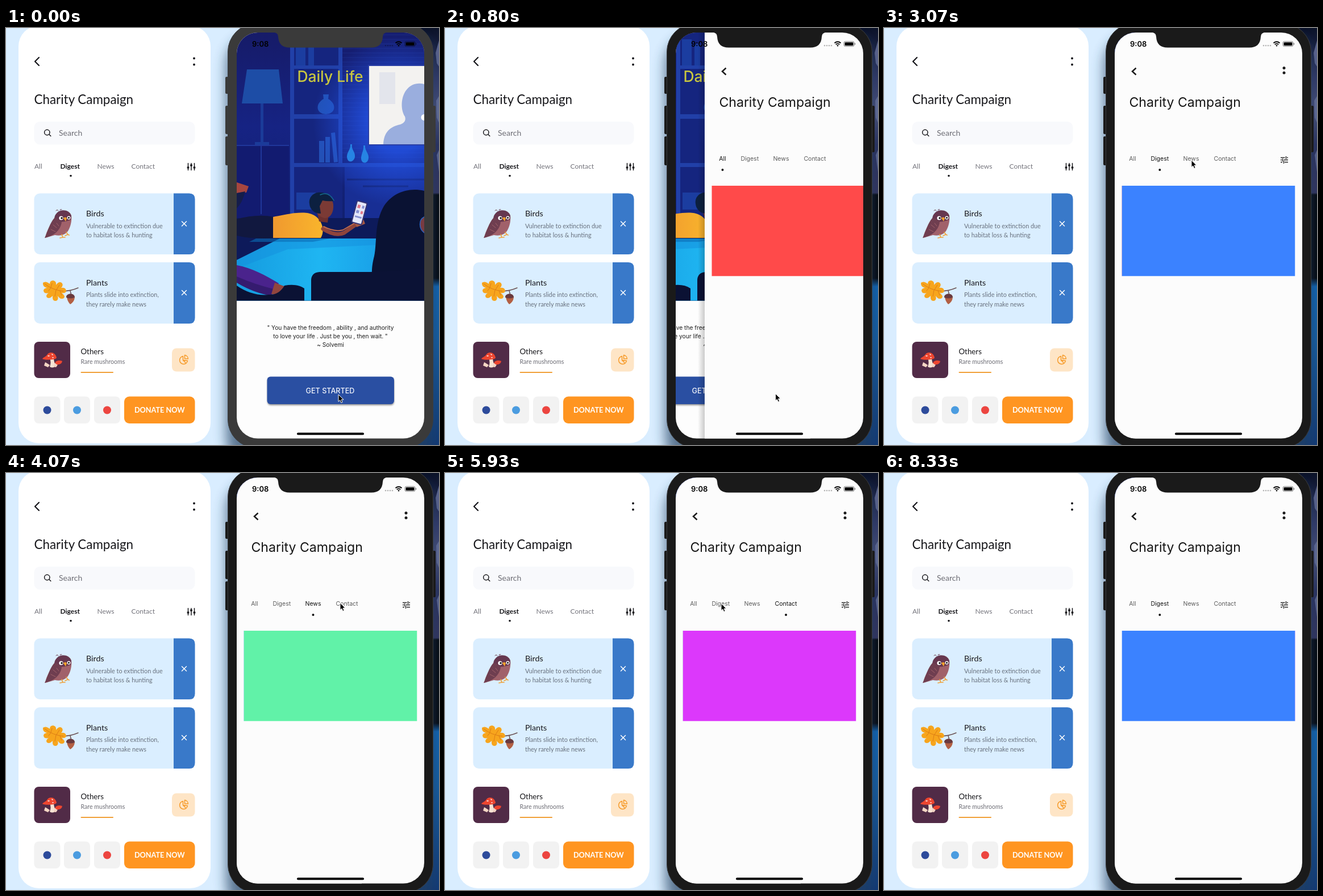
An HTML page for the animation above (8.39 s loop, 762 by 735 pixels).

```html
<!DOCTYPE html>
<html lang="en">
<head>
<meta charset="utf-8">
<title>Charity Campaign</title>
<style>
  html, body { margin: 0; width: 100%; height: 100%; overflow: hidden; background: #d9edff; }
  svg { display: block; width: 762px; height: 735px; }
  .card { font-family: Lato, sans-serif; }
  .phone { font-family: Inter, sans-serif; }
  .mid { text-anchor: middle; }
  .line { fill: none; stroke-linecap: round; stroke-linejoin: round; }
</style>
</head>
<body>
<svg viewBox="0 0 762 735" xmlns="http://www.w3.org/2000/svg">
  <defs>
    <clipPath id="screen"><rect x="406" y="8" width="330" height="715.5" rx="37"/></clipPath>
    <clipPath id="tabView"><rect x="418.5" y="278" width="305" height="159.5"/></clipPath>
    <clipPath id="art"><rect x="406" y="8" width="330" height="472.5"/></clipPath>
    <filter id="blur" x="-20%" y="-20%" width="140%" height="140%"><feGaussianBlur stdDeviation="11"/></filter>
    <filter id="soft" x="-20%" y="-40%" width="140%" height="180%"><feGaussianBlur stdDeviation="1.6"/></filter>
    <linearGradient id="wall" x1="0" y1="0" x2="0" y2="1">
      <stop offset="0" stop-color="#161b68"/><stop offset=".35" stop-color="#162383"/>
      <stop offset=".7" stop-color="#11206f"/><stop offset="1" stop-color="#0b1750"/>
    </linearGradient>
    <radialGradient id="glow" gradientUnits="userSpaceOnUse" cx="690" cy="165" r="150">
      <stop offset=".35" stop-color="#2459f5" stop-opacity=".75"/><stop offset="1" stop-color="#2459f5" stop-opacity="0"/>
    </radialGradient>
    <linearGradient id="rug" x1="0" y1="0" x2="1" y2="0">
      <stop offset="0" stop-color="#159bdf"/><stop offset=".45" stop-color="#1fb6f2"/><stop offset="1" stop-color="#1590e0"/>
    </linearGradient>
    <linearGradient id="edge"><stop offset="0" stop-opacity="0"/><stop offset="1" stop-opacity=".2"/></linearGradient>
    <linearGradient id="desk" x1="0" y1="0" x2="0" y2="1">
      <stop offset="0" stop-color="#0a1228"/><stop offset=".12" stop-color="#34386a"/><stop offset=".2" stop-color="#50547f"/>
      <stop offset=".28" stop-color="#2c3060"/><stop offset=".395" stop-color="#35325f"/><stop offset=".4" stop-color="#020308"/>
      <stop offset=".6" stop-color="#020308"/><stop offset=".62" stop-color="#0f69bd"/><stop offset=".75" stop-color="#1460a8"/>
      <stop offset="1" stop-color="#0f3878"/>
    </linearGradient>
    <linearGradient id="shirt"><stop offset="0" stop-color="#f0992f"/><stop offset="1" stop-color="#f9b52c"/></linearGradient>
  </defs>

  <rect width="762" height="735" fill="#d9edff"/>
  <rect x="700" width="62" height="735" fill="url(#desk)"/>
  <path d="M762 22l-6 22 2 18 4 6zM762 120l-5 8 1 30 4 9zM762 215l-4 9 4 30z" fill="#7a81ae" opacity=".7"/>
  <rect x="388" y="14" width="366" height="760" rx="50" fill="#223f60" opacity=".7" filter="url(#blur)"/>

  <!-- design card -->
  <g class="card" fill="#17171b">
    <rect x="22" y="-4" width="338" height="736" rx="36" fill="#fff"/>
    <path class="line" d="M58 52l-7 7 7 7" stroke="#17171b" stroke-width="2.2"/>
    <circle cx="331" cy="53.5" r="1.9"/><circle cx="331" cy="64.5" r="1.9"/>
    <text x="49.5" y="133.5" font-size="22.4">Charity Campaign</text>
    <rect x="49.5" y="165" width="283" height="40.5" rx="10" fill="#f8f9fc"/>
    <g class="line" stroke="#17171b" stroke-width="1.5"><circle cx="72.3" cy="184" r="4.7"/><path d="M75.8 187.5l3 3"/></g>
    <text x="93" y="190" font-size="14" fill="#6c6c74">Search</text>
    <g font-size="12" fill="#74747c">
      <text x="50" y="248">All</text>
      <text x="95.5" y="248" font-weight="700" fill="#17171b">Digest</text>
      <text x="160.5" y="248">News</text>
      <text x="220.5" y="248">Contact</text>
    </g>
    <circle cx="114" cy="260.5" r="1.8"/>
    <path class="line" d="M320.5 238.5v12M326 238.5v12M331.5 238.5v12" stroke="#17171b" stroke-width="1.5"/>
    <circle cx="320.5" cy="246" r="2"/><circle cx="326" cy="242" r="2"/><circle cx="331.5" cy="246" r="2"/>

    <g id="cards"></g>

    <!-- bird -->
    <path d="M92 322q-2-3-4 0M95 321q0-2 3-1" class="line" stroke="#68384b"/>
    <path d="M88 331c4-12 24-12 27 0 1 8-1 19-6 27-5 7-14 9-23 7l-17 5c2-13 10-24 19-39z" fill="#a1616a"/>
    <path d="M85 337c0-17 24-22 30-6l-1 7-9 3-10 1z" fill="#66374f"/>
    <path d="M85 335c-8 9-11 22-17 35 16-4 27-12 30-27-2-5-8-8-13-8z" fill="#6f3e50"/>
    <path d="M83 347l6 5M79 355l8 4M89 344l4 5" class="line" stroke="#a1636a"/>
    <circle cx="97" cy="335" r="3.6" fill="#fff"/><circle cx="110.500" cy="334.500" r="3" fill="#fff"/>
    <circle cx="98" cy="335" r="1.8"/><circle cx="110.500" cy="334.500" r="1.600"/>
    <path d="M101 335q3-3 6 0l-2 6z" fill="#f5a32c"/>
    <path class="line" d="M98 364l2 5-5 1M100 369l4 0M106 360l3 4-5 2M109 364l2 1" stroke="#f0a13a" stroke-width="1.700"/>

    <!-- oak leaf and acorn -->
    <path class="line" d="M84 462q22 5 43-4M113 463l2 8" stroke="#6c5354" stroke-width="1.500"/>
    <path d="M65 449q5-4 12 2 0-6 6-6 6 1 5 8 5-7 10-4 4 4-1 9 8-1 9 5 0 5-8 4 7 5 4 9-6 4-11-4 2 8-3 9-7 1-6-9-5 6-10 3-3-4 3-8-8 2-9-4 0-4 6-5-8-2-7-9z" fill="#f7a51d"/>
    <path class="line" d="M68 451q14 11 33 13M79 457l2-7M89 461l5-8M79 458l-4 5M88 462l-2 11M95 463l3 8" stroke="#dd7d15"/>
    <path d="M107 474q7 3 14 1-1 8-8 12-5-5-6-13z" fill="#b35f43"/>
    <path d="M106 475c-1-8 15-9 15 0q-8 3-15 0z" fill="#693a3e"/>

    <!-- mushrooms -->
    <rect x="49.5" y="553" width="63.5" height="64" rx="8" fill="#512b47"/>
    <path d="M77 581h7q0 8 4 14-5 6-11 2 3-7 0-16z" fill="#f7e4d4"/>
    <path d="M64 583c2-3 7-4 9-8 4-5 14-4 16 6 1 4-22 5-25 2z" fill="#ed4630"/>
    <path d="M85 591l6 0q0 4-3 7l-4-1z" fill="#f3d4c4"/><path d="M86 590q4-6 13-3-1 7-10 6z" fill="#ed4630"/>
    <path d="M69 589l8 5-3 4-7-3z" fill="#f4d6c4"/>
    <path d="M74 578h2M81 575l1 1M82 581h1" class="line" stroke="#fff" stroke-width="1.500"/>

    <text x="131.5" y="574.5" font-size="13.3">Others</text>
    <text x="131.5" y="592" font-size="10.6" fill="#6c6c74">Rare mushrooms</text>
    <rect x="131.5" y="606" width="57.5" height="2" rx="1" fill="#f0a038"/>
    <rect x="292" y="564.5" width="40.5" height="41" rx="8" fill="#fee5c6"/>
    <path class="line" d="M311.500 578.500a7 7 0 1 0 8 8l-8-1zM314.500 576.500a7 7 0 0 1 6 6.500h-6zM311.500 585.500l5 5" stroke="#f69c2c" stroke-width="1.500"/>

    <g fill="#f2f2f2">
      <rect x="49.5" y="649.5" width="46" height="47.5" rx="8"/>
      <rect x="102" y="649.5" width="46" height="47.5" rx="8"/>
      <rect x="155" y="649.5" width="46" height="47.5" rx="8"/>
    </g>
    <circle cx="72.5" cy="673.5" r="7" fill="#2d4b9b"/>
    <circle cx="125" cy="673.5" r="7" fill="#4b9ce0"/>
    <circle cx="178" cy="673.5" r="7" fill="#ec4540"/>
    <rect x="208" y="649.5" width="124.5" height="47.5" rx="9" fill="#ff9521"/>
    <text class="mid" x="270.3" y="677.5" font-size="12.7" font-weight="700" fill="#fff">DONATE NOW</text>
  </g>

  <!-- phone -->
  <g class="phone">
    <g id="bezel" fill="#1a1a1a">
      <path d="M386 88q0-2 2-2h4v30h-4q-2 0-2-2zM386 139q0-2 2-2h4v50h-4q-2 0-2-2zM386 193q0-2 2-2h4v51h-4q-2 0-2-2zM750 137h4q2 0 2 2v78q0 2-2 2h-4z"/>
      <rect x="390.5" y="-8" width="361" height="748" rx="50" stroke="#3b3c3e"/>
    </g>
    <g clip-path="url(#screen)">
      <g id="landing">
        <rect x="406" y="8" width="330" height="716" fill="#fdfdfd"/>
        <g clip-path="url(#art)">
          <rect x="406" y="8" width="330" height="473" fill="url(#wall)"/>
          <rect x="592" y="8" width="144" height="232" fill="#151d70"/>
          <path id="blinds" stroke="#243492" opacity=".6"/>
          <rect x="500" y="8" width="92" height="330" fill="#15257f"/>
          <path d="M500 8h7v325h-7zM585 8h7v230h-7zM500 66h92v6h-92zM500 152h92v8h-92zM500 238h236v7h-236z" fill="#2140a8"/>
          <path d="M510 20h17v46h-17zM532 28h10v38h-10zM511 290h34v30h-34z" fill="#1b3da0"/>
          <path d="M424 73h56l7 60h-72z" fill="#1d4da6"/><path d="M448 133h5v68h-5zM438 201h25v5h-25z" fill="#1b3b99"/>
          <path d="M406 206h92v130h-92z" fill="#121b70"/><path d="M406 207h92M449 208v120" stroke="#20379a" stroke-width="2"/>
          <path d="M558 117h10l-1 8c15 8 14 26-4 27-18-1-19-19-4-27z" fill="#2152b6"/>
          <path d="M551 199h9v38h-9zM562 192h8v45h-8zM572 185l7-1 5 52-7 1z" fill="#2350b5"/>
          <rect x="596" y="245" width="140" height="95" fill="#182e94"/>
          <path d="M600 267h136M628 279h80" stroke="#12206f" stroke-width="3"/>
          <rect x="500" y="8" width="236" height="330" fill="url(#glow)"/>
          <rect x="638" y="66" width="106" height="140" fill="#f3f2f0" stroke="#2a3fa6" stroke-width="2"/>
          <rect x="657" y="78" width="28" height="56" fill="#e3e5ec"/>
          <path d="M664 205c1-22 12-31 30-35 8-3 10-8 8-14-8-12-7-34 2-46 9-12 21-14 32-11v106z" fill="#9aaede"/>
          <circle cx="736" cy="157.5" r="5.5" fill="#fff"/>
          <path d="M606 205h3c-2 9 6 13 5 22-1 9-13 13-14 0 0-9 7-13 6-22zM629 207h3c-1 9 7 14 6 22-1 12-14 11-13-1 1-8 5-13 4-21z" fill="#2684e4"/>
          <path d="M406 335h330v146h-330z" fill="#0d1a5a"/>
          <path d="M406 409l76-38h254v110h-330z" fill="url(#rug)"/>
          <path d="M406 424l90-34 164-8v-11h-178l-76 38z" fill="#1590dd" opacity=".5"/>
          <path d="M440 371h130l-30 6h-112z" fill="#0b6fb8" opacity=".6"/>
          <!-- reader -->
          <path d="M406 272l21 7-4 11-17 1z" fill="#a6463f"/>
          <path d="M406 337q35-10 66-4v37q-36 3-66-4z" fill="#11183f"/>
          <path d="M406 291l15-3q-5 20-15 30z" fill="#151d4a"/>
          <path d="M470 333c23-4 56-13 72-3 14 8 20 26 12 40h-84z" fill="url(#shirt)"/>
          <path d="M548 327h20l-2 16-15-2z" fill="#6c302f"/>
          <path d="M539 302c12-12 36-6 37 9 1 13-4 23-14 24-12-1-22-14-23-33z" fill="#7b3a35"/>
          <path d="M534 310c-3-21 24-27 37-12l6 7q-12 1-20-1l-5 10 2 13c-8 1-19-5-20-17z" fill="#0c2040"/>
          <path d="M553 294q15-7 24 10" class="line" stroke="#146d8e" stroke-width="1.5"/>
          <path class="line" d="M558 354q22 14 37 7l24-17" stroke="#8f443b" stroke-width="7"/>
          <path class="line" d="M559 350q19 10 34 6l22-13" stroke="#c06b4b" stroke-width="2"/>
          <path d="M612 339l17-2 3 8-15 6z" fill="#a65843"/>
          <g transform="rotate(15 622 325)">
            <rect x="613" y="306" width="18" height="39" rx="2" fill="#e4e7fa" stroke="#353474" stroke-width="2"/>
            <path d="M616 312h5v6h-5zM624 322h4v5h-4z" fill="#e2788a"/><path d="M624 312h4v5h-4zM616 322h5v5h-5zM616 332h12v3h-12z" fill="#8791d2"/>
          </g>
          <!-- foreground figures -->
          <path d="M655 480c-15-38-12-58-7-78 5-25 0-59 17-88 14-22 41-34 71-27v194z" fill="#0a1233"/>
          <path d="M736 333c-10 5-10 20 0 28z" fill="#783b42"/>
          <path class="line" d="M736 333c-10 5-10 20 0 28" stroke="#2c63bd" stroke-width="1.5"/>
          <path d="M537 481v-36q0-14 15-15h80q28 0 104-6v57z" fill="#0b1235"/>
          <path d="M406 418c28 5 50 18 74 32l-8 18q-28-4-66-21z" fill="#4a238c"/>
          <path d="M406 438q32 14 65 22l-3 12q-30-4-62-23z" fill="#351b6f"/>
          <path d="M473 449l19 7-10 15-15-2z" fill="#91453e"/>
          <path d="M463 470q17 1 27-16 22-4 35 5v22h-119v-27q27 19 57 16z" fill="#0b1234"/>
        </g>
        <text class="mid" x="570.5" y="95" font-size="26.4" font-weight="500" fill="#c8c63f">Daily Life</text>
        <g class="mid" font-size="10.2" fill="#1d1d1d">
          <text x="571" y="531.5">" You have the freedom , ability , and authority</text>
          <text x="571" y="547">to love your life . Just be you , then wait. "</text>
          <text x="571" y="562">~ Solvemi</text>
        </g>
        <rect x="460" y="617" width="223" height="48" rx="6" fill="#000" opacity=".42" filter="url(#soft)"/>
        <rect x="459.5" y="614.5" width="223.5" height="48.5" rx="6" fill="#2a4fa2"/>
        <text class="mid" x="570.5" y="643.5" font-size="12.6" font-weight="500" fill="#f2f5fc">GET STARTED</text>
      </g>

      <g id="campaign">
        <rect x="394" y="8" width="12" height="716" fill="url(#edge)"/>
        <rect x="406" y="8" width="330" height="716" fill="#fcfcfc"/>
        <path d="M443.5 70.5l-6.5 6 6.5 6" fill="none" stroke="#1c1c1c" stroke-width="2.5"/>
        <circle cx="704" cy="70.5" r="2.5" fill="#1c1c1c"/><circle cx="704" cy="79" r="2.5" fill="#1c1c1c"/>
        <text x="431.5" y="138.5" font-size="23.1" fill="#161616">Charity Campaign</text>
        <path d="M698 228.5h7.5M709 228.5h2M698 232.5h2M703.5 232.5h7.5M698 236.5h3M705 236.5h6M707.5 226v5M701.5 230v5M703.5 234v5" stroke="#252525" stroke-width="1.4"/>
        <g id="tabs" class="mid" font-size="10.5"></g>
        <circle id="dot" cy="250" r="2" fill="#111"/>
        <g clip-path="url(#tabView)">
          <rect id="leaving" y="278" width="305" height="159.5"/>
          <rect id="entering" y="278" width="305" height="159.5"/>
        </g>
      </g>
      <rect x="512" y="713.3" width="118" height="4" rx="2"/>
    </g>
    <path id="notch" d="M471 7.5q8 1 8 8 1 19 20 19h144q19 0 20-19 0-7 8-8z" fill="#1a1a1a"/>
    <text x="433" y="33" font-size="13" font-weight="600">9:08</text>
    <g opacity=".28"><circle cx="668" cy="31" r="1.3"/><circle cx="672" cy="31" r="1.3"/><circle cx="676" cy="31" r="1.3"/><circle cx="680" cy="31" r="1.3"/></g>
    <path d="M685.5 26.5q5.5-4.5 11 0M687.7 29q3.3-2.7 6.6 0" fill="none" stroke="#000" stroke-width="1.8"/><path d="M689.2 30.8q1.8-1.5 3.6 0l-1.8 2z"/>
    <g stroke="#000" stroke-opacity=".5"><rect x="702" y="23.8" width="18" height="8.6" rx="2.5" fill="none"/><path d="M721.5 26.5v3" stroke-width="1.3"/></g>
    <rect x="703.5" y="25.2" width="15" height="5.8" rx="1.3"/>
  </g>
  <path id="cursor" d="M0 0v12.5l2.8-2.6 2 4.6 2.3-1-2-4.5h4z" stroke="#fff"/>
</svg>
<script>
const LOOP = 8390;
const byId = id => document.getElementById(id);
const mix = (a, b, p) => a + (b - a) * p;
const unit = v => Math.min(1, Math.max(0, v));

function bezier(x1, y1, x2, y2) {
  const at = (a, b, s) => 3 * (1 - s) ** 2 * s * a + 3 * (1 - s) * s * s * b + s ** 3;
  return x => {
    if (x <= 0 || x >= 1) return unit(x);
    let lo = 0, hi = 1;
    for (let i = 0; i < 24; i++) {
      const mid = (lo + hi) / 2;
      if (at(x1, x2, mid) < x) lo = mid; else hi = mid;
    }
    return at(y1, y2, lo);
  };
}
const pageEase = bezier(.35, .91, .33, .97);
const tabEase = bezier(.25, .1, .25, 1);

const cardRows = [
  [291.5, 107.5, 'Birds', 'Vulnerable to extinction due', 'to habitat loss &amp; hunting'],
  [413, 108, 'Plants', 'Plants slide into extinction,', 'they rarely make news'],
];
byId('cards').innerHTML = cardRows.map(([y, h, title, first, second]) => `
  <rect x="49.5" y="${y}" width="283" height="${h}" rx="10" fill="#daeeff"/>
  <path d="M295 ${y}h27.5q10 0 10 10v${h - 20}q0 10-10 10h-27.5z" fill="#3979c9"/>
  <path class="line" d="M309.5 ${y + 49.5}l8 8m0-8l-8 8" stroke="#fff" stroke-width="1.5"/>
  <text x="141" y="${y + 40.8}" font-size="14.3">${title}</text>
  <g font-size="10.85" fill="#68717d">
    <text x="141" y="${y + 61.3}">${first}</text><text x="141" y="${y + 77.5}">${second}</text>
  </g>`).join('');

byId('blinds').setAttribute('d', Array.from({ length: 28 }, (_, i) => `M592 ${12 + i * 8}h144`).join(''));

const tabs = [
  { name: 'All', x: 437.5, color: '#ff4a4a' },
  { name: 'Digest', x: 485.3, color: '#3b82ff' },
  { name: 'News', x: 540.5, color: '#61f2a8' },
  { name: 'Contact', x: 600, color: '#dc38fb' },
];
byId('tabs').innerHTML = tabs.map(t => `<text x="${t.x}" y="234">${t.name}</text>`).join('');
const labels = [...byId('tabs').children];

// [time, tab index]
const selections = [[0, 0], [2120, 1], [3130, 2], [4150, 3], [5970, 1]];

// [time, x, y]
const pointer = [
  [0, 585, 646], [800, 581.5, 644.5], [1250, 581, 644], [1950, 498, 233], [2250, 498, 233],
  [2900, 541, 233], [3300, 541, 233], [3900, 588, 229], [4400, 588, 229], [5000, 575, 236],
  [5700, 486, 230], [6300, 486, 230], [6800, 474, 150], [7330, 458, 79], [7900, 446, -30], [LOOP, 446, -30],
];

function drawPointer(t) {
  const i = Math.max(1, pointer.findIndex(k => k[0] > t));
  const [a, b] = [pointer[i - 1], pointer[i]];
  const p = unit((t - a[0]) / (b[0] - a[0])), s = p * p * (3 - 2 * p);
  byId('cursor').setAttribute('transform', `translate(${mix(a[1], b[1], s)} ${mix(a[2], b[2], s)})`);
}

function drawTabs(t) {
  const now = selections.findLastIndex(s => s[0] <= t);
  const [start, to] = selections[now];
  const from = selections[Math.max(0, now - 1)][1];
  const p = tabEase((t - start) / 300), side = to < from ? -1 : 1;
  byId('dot').setAttribute('cx', mix(tabs[from].x, tabs[to].x, p));
  const place = (id, tab, shift) => {
    byId(id).setAttribute('x', 418.5 + 305 * shift);
    byId(id).setAttribute('fill', tab.color);
  };
  place('leaving', tabs[from], -side * p);
  place('entering', tabs[to], from === to ? 0 : side * (1 - p));
  labels.forEach((label, i) => {
    const on = i === to ? (from === to ? 1 : p) : i === from ? 1 - p : 0;
    const g = mix(92, 17, on);
    label.setAttribute('fill', `rgb(${g},${g},${g})`);
  });
}

function draw(t) {
  const p = pageEase((t - 639) / 410);
  byId('landing').setAttribute('transform', `translate(${-110 * p} 0)`);
  byId('campaign').setAttribute('transform', `translate(${330 * (1 - p)} 0)`);
  byId('campaign').setAttribute('visibility', p > 0 ? 'visible' : 'hidden');
  const shell = t < 70 ? '#3a3a3a' : '#1a1a1a';
  byId('bezel').setAttribute('fill', shell);
  byId('notch').setAttribute('fill', shell);
  drawTabs(t);
  drawPointer(t);
}

const began = performance.now();
function tick() {
  draw((performance.now() - began) % LOOP);
  requestAnimationFrame(tick);
}
tick();
</script>
</body>
</html>
```
